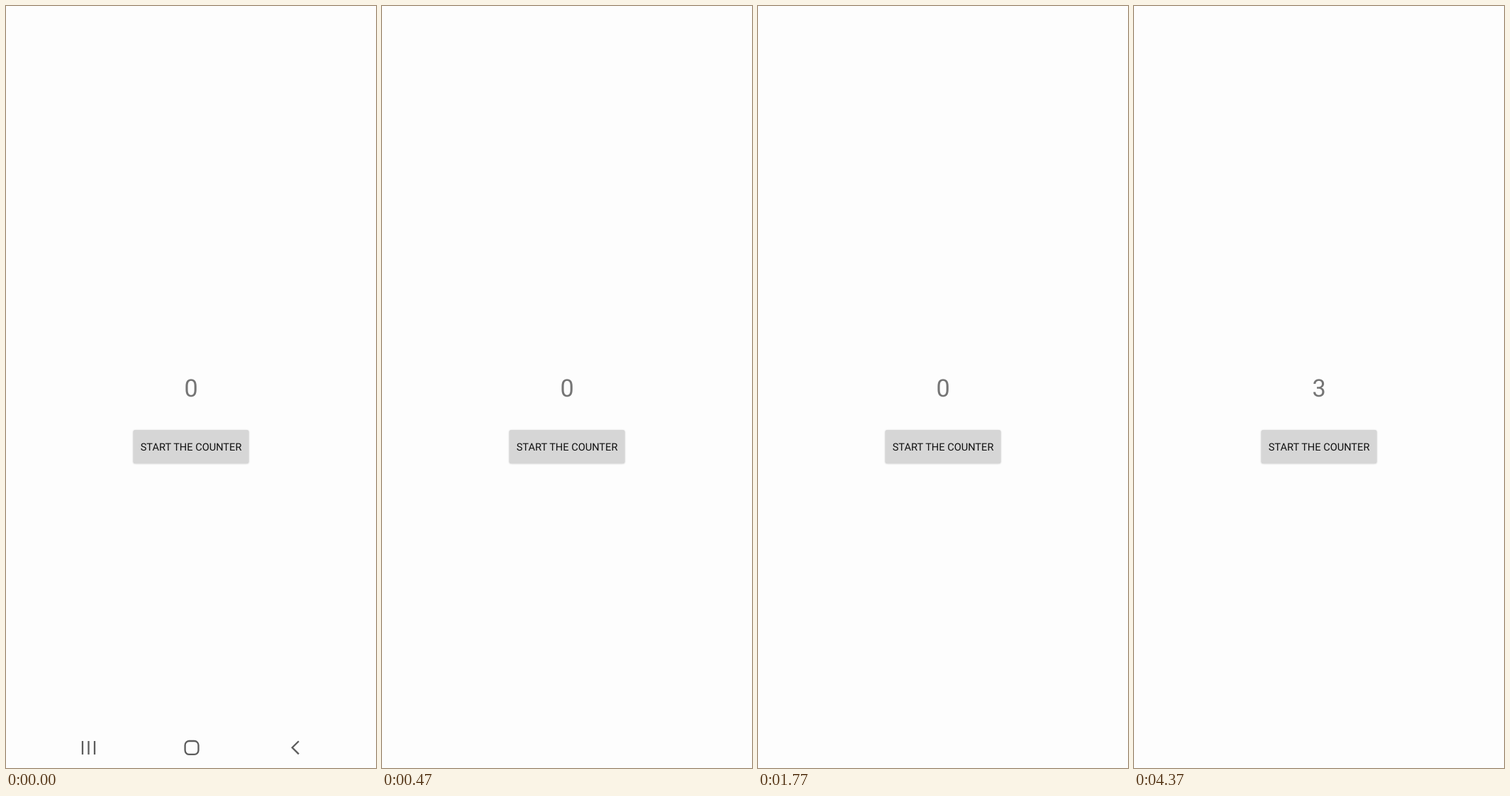
An HTML page that plays this animation: 522x1073 px, repeating every 4460 ms.

```html
<!DOCTYPE html>
<html lang="en">
<head>
<meta charset="utf-8">
<title>Counter</title>
<style>
  html, body { margin: 0; width: 100%; height: 100%; overflow: hidden; background: #fdfdfd; }
  svg { display: block; width: 100%; height: 100%; }
  text { font-family: Roboto, sans-serif; text-rendering: geometricPrecision; }
</style>
</head>
<body>
<svg viewBox="0 0 522 1073">
  <defs>
    <clipPath id="face"><rect x="179.5" y="597" width="163" height="47" rx="2.5"/></clipPath>
    <filter id="soft" x="-10%" y="-30%" width="120%" height="160%"><feGaussianBlur stdDeviation="1.1"/></filter>
  </defs>
  <rect width="522" height="1073" fill="#fdfdfd"/>

  <g id="bar">
    <rect id="barFill" width="522" height="71" fill="#ff9b10"/>
    <text x="20.5" y="43.7" font-size="20.2" font-weight="500" fill="#fff">Uki Pabi</text>
  </g>

  <rect id="band" y="1012" width="522" height="61" fill="#f8f8f8"/>
  <g id="nav" fill="none" stroke="#5c5c5c" stroke-width="2.3">
    <path d="M108 1035v19M116.5 1035v19M125 1035v19"/>
    <rect x="252.6" y="1035" width="18.9" height="18.9" rx="5.8"/>
    <path d="M413 1035.2L403.8 1044.3L413 1053.4"/>
  </g>

  <text id="count" x="261.1" y="549.9" font-size="34.2" fill="#757575" text-anchor="middle">0</text>

  <rect id="shadow" x="179.5" width="163" height="47" rx="2.5" filter="url(#soft)"/>
  <g clip-path="url(#face)">
    <rect x="179" y="596" width="164" height="49" fill="#d6d6d6"/>
    <rect id="tint" x="179" y="596" width="164" height="49"/>
    <circle id="ripple" cx="261" cy="620.5"/>
  </g>
  <text x="261" y="626" font-size="14.6" fill="#111" text-anchor="middle">START THE COUNTER</text>
</svg>
<script>
const LOOP = 4460;
const STEP = LOOP / 48;
const $ = id => document.getElementById(id);
const set = (id, attrs) => {
  for (const k in attrs) $(id).setAttribute(k, attrs[k]);
};
const ramp = (t, from, to) => Math.min(1, Math.max(0, (t - from) / (to - from)));

// App bar and navigation fade out; the icons sink as they go.
function drawChrome(t) {
  const p = ramp(t, 100, 460);
  set("bar", { visibility: p > 0 && p < 1 ? "visible" : "hidden" });
  set("barFill", { opacity: (1 - p) ** 2 });
  set("band", { opacity: Math.sin(Math.PI * p) });
  set("nav", { opacity: 1 - p * p, transform: `translate(0 ${18 * p * p})` });
}

// The press spreads a ripple and lifts the button, then both fade.
function drawButton(t) {
  const grow = ramp(t, 1030, 1400);
  const hold = grow * (1 - ramp(t, 1490, 1760));
  set("tint", { opacity: 0.08 * hold });
  set("ripple", { r: 90 * grow, opacity: 0.08 * hold });
  set("shadow", { y: 597.6 + 2 * hold, opacity: 0.2 + 0.2 * hold });
}

function draw(t) {
  // The screen refreshes in coarse steps.
  const shown = Math.floor((t + 10) / STEP) * STEP;
  drawChrome(shown);
  drawButton(shown);
  $("count").textContent = Math.max(0, Math.floor((t - 1310) / 1020));
}

const start = performance.now();
function tick() {
  draw((performance.now() - start) % LOOP);
  requestAnimationFrame(tick);
}
draw(0);
requestAnimationFrame(tick);
</script>
</body>
</html>
```
